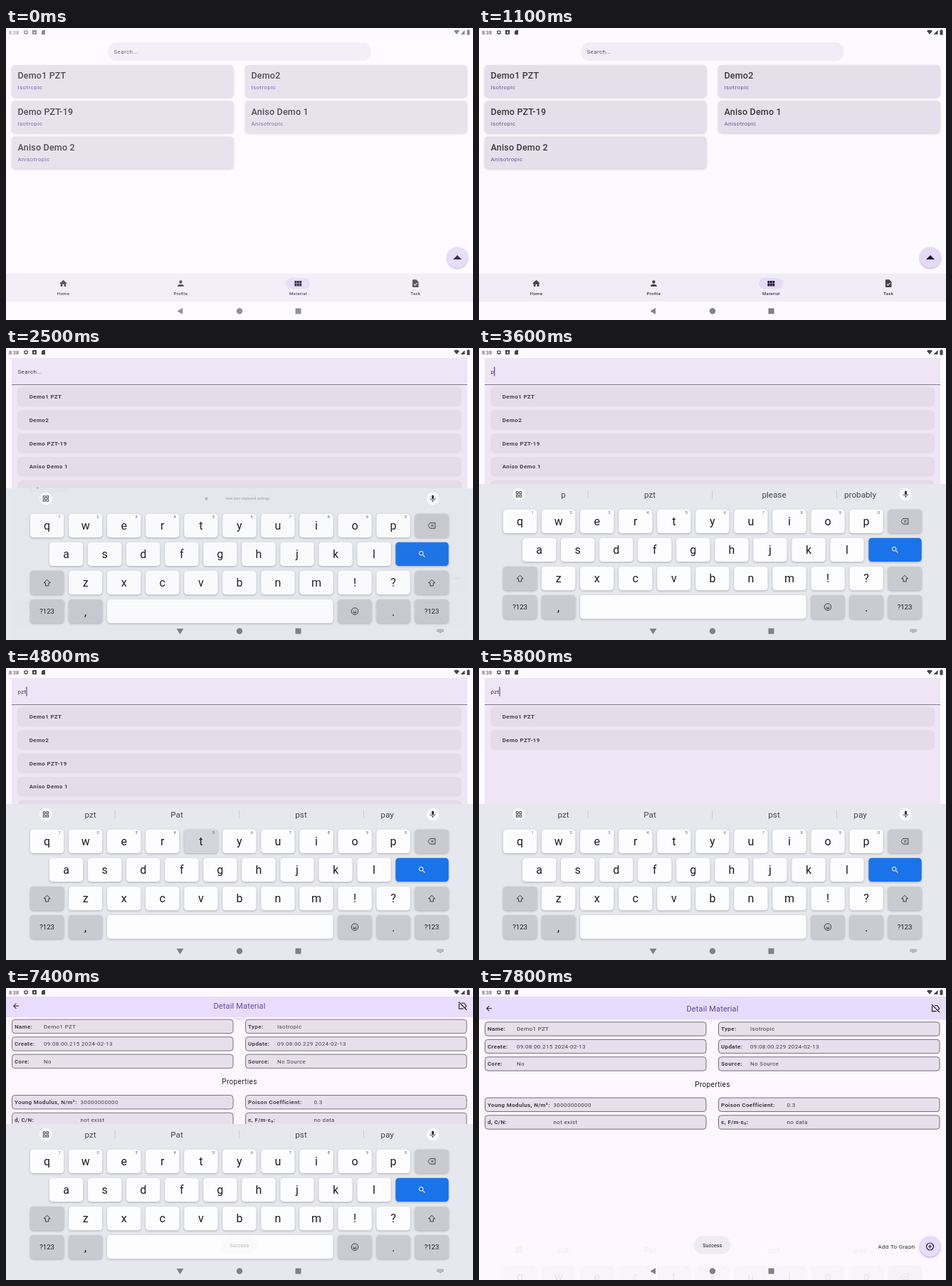
An HTML page with a canvas that plays this animation: 656 px wide and 410 px high, repeating every 8 s.

```html
<!DOCTYPE html>
<html lang="en">
<head>
<meta charset="utf-8">
<title>Material search</title>
<style>
html, body { margin: 0; width: 100%; height: 100%; overflow: hidden; background: #fdfaff; }
canvas { display: block; }
</style>
</head>
<body>
<canvas id="stage" width="656" height="410"></canvas>
<script>
const c = document.getElementById('stage').getContext('2d');
const LOOP = 8000, STEP = 100;
const INK = '#1d1b20';

const icons = {
  home: 'M10 20v-6h4v6h5v-8h3L12 3 2 12h3v8z',
  person: 'M12 12a4 4 0 1 0 0-8 4 4 0 0 0 0 8zm0 2c-2.67 0-8 1.34-8 4v2h16v-2c0-2.66-5.33-4-8-4z',
  grid: 'M3 5h5.3v6.5H3zM9.3 5h5.3v6.5H9.3zM15.7 5H21v6.5h-5.3zM3 12.5h5.3V19H3zM9.3 12.5h5.3V19H9.3zM15.7 12.5H21V19h-5.3z',
  task: 'M14 2H6a2 2 0 0 0-2 2v16a2 2 0 0 0 2 2h12a2 2 0 0 0 2-2V8zM10.5 18L7 14.5l1.4-1.4 2.1 2.1 5-5 1.4 1.4z',
  search: 'M15.5 14h-.8l-.3-.3A6.5 6.5 0 1 0 13.7 14.4l.3.3v.8l5 5 1.5-1.5zM9.5 14a4.5 4.5 0 1 1 0-9 4.5 4.5 0 0 1 0 9z',
  erase: 'M7 4h15v16H7L1.5 12zM10 8.5l7 7M17 8.5l-7 7',
  shift: 'M12 4L3.5 12.5H8V20h8v-7.500h4.500z',
  smile: 'M22 12a10 10 0 1 1-20 0 10 10 0 0 1 20 0zM8 8.500v2M16 8.500v2M7 14.500c2 4 8 4 10 0z',
  mic: 'M12 14a3 3 0 0 0 3-3V5a3 3 0 0 0-6 0v6a3 3 0 0 0 3 3zm5.300-3a5.300 5.100 0 0 1-10.600 0H5c0 3.400 2.700 6.200 6 6.700V21h2v-3.300c3.300-.5 6-3.300 6-6.700z',
  apps: 'M3 3h7v7H3zM14 3h7v7h-7zM3 14h7v7H3zM14 14h7v7h-7z',
  back: 'M20 11H7.800l5.600-5.600L12 4l-8 8 8 8 1.400-1.400L7.800 13H20z',
  labelOff: 'M9 5h7l5 7-4 5.500M14 19H3V6.500M2 2l20 20',
  addCircle: 'M22 12a10 10 0 1 1-20 0 10 10 0 0 1 20 0zM12 7v10M7 12h10',
  gear: 'M18 12a6 6 0 1 1-12 0 6 6 0 0 1 12 0zM12 2v4M12 18v4M3.300 7l3.500 2M17.200 15l3.500 2M3.300 17l3.500-2M17.200 9l3.500-2',
  letter: 'M3 3h18v18H3zM12 6L7.500 18h2.300l.9-3h2.600l.9 3h2.300z',
  sdCard: 'M10 2h10v20H4V8z',
  wifi: 'M12 21L0 6c7-5 17-5 24 0z',
  signal: 'M2 22h20V2z',
  battery: 'M9 4V1h6v3h3v19H6V4z',
  keyboard: 'M1 6h22v8H1zM5 10h14M9 18h6'
};
for (const name in icons) icons[name] = new Path2D(icons[name]);

const clamp = v => Math.min(1, Math.max(0, v));
const lerp = (a, b, p) => a + (b - a) * p;
const easeOut = (p, power) => 1 - (1 - clamp(p)) ** power;

function icon(name, x, y, size, color, stroke) {
  c.save();
  c.translate(x, y);
  c.scale(size / 24, size / 24);
  c.translate(-12, -12);
  c.fillStyle = c.strokeStyle = color;
  c.lineWidth = stroke;
  if (stroke) c.stroke(icons[name]); else c.fill(icons[name], 'evenodd');
  c.restore();
}

// y is the middle of the capitals
function text(str, x, y, size, { color = INK, weight = 400, align = 'left', spacing = 0.35 } = {}) {
  c.font = `${weight} ${size}px Roboto, sans-serif`;
  c.letterSpacing = spacing + 'px';
  c.textAlign = align;
  c.fillStyle = color;
  c.fillText(str, x, y + size * 0.355);
}

function box(x, y, w, h, r, fill, { stroke, shadow } = {}) {
  c.save();
  c.beginPath();
  c.roundRect(x, y, w, h, r);
  if (shadow) { c.shadowColor = shadow; c.shadowBlur = 3; c.shadowOffsetY = 1; }
  c.fillStyle = fill;
  c.fill();
  c.shadowColor = 'transparent';
  if (stroke) { c.strokeStyle = stroke; c.stroke(); }
  c.restore();
}

const disc = (x, y, r, fill, shadow) => box(x - r, y - r, 2 * r, 2 * r, r, fill, { shadow });

function poly(fill, ...points) {
  c.beginPath();
  points.forEach(p => c.lineTo(...p));
  c.fillStyle = fill;
  c.fill();
}

const materials = ['Demo1 PZT', 'Demo2', 'Demo PZT-19', 'Aniso Demo 1', 'Aniso Demo 2'];
const typing = [
  [2000, '', []],
  [3400, 'p', ['p', 'pzt', 'please', 'probably']],
  [4200, 'pz', ['pz', 'pizza', 'pzt', 'puzzle']],
  [4800, 'pzt', ['pzt', 'Pat', 'pst', 'pay']]
];
const presses = [[3200, 'p'], [4100, 'z'], [4700, 't'], [5200, 'search']];

function statusBar(t) {
  c.fillStyle = '#fdf9fe';
  c.fillRect(0, 0, 656, 12);
  c.save();
  if (t < 100) c.globalAlpha = 0.7;
  const color = '#45434a';
  text('8:38', 4, 6.3, 7.3, { color, spacing: 0 });
  icon('gear', 28, 6, 8, color, 3.5);
  icon('letter', 40, 6, 8, color);
  icon('sdCard', 52.5, 6, 7.5, color);
  icon('wifi', 633, 6, 8, color);
  icon('signal', 641.5, 6, 7, color);
  icon('battery', 649.5, 6, 8, color);
  c.restore();
}

function systemNav(keyboardOpen) {
  const color = '#828087';
  if (keyboardOpen) {
    poly(color, [239.5, 394], [249.5, 394], [244.5, 402]);
    icon('keyboard', 610, 397.5, 9, color, 2);
  } else poly(color, [240.5, 397.5], [248, 393], [248, 402]);
  disc(328, 397.5, 4.2, color);
  box(406.5, 393.5, 8, 8, 0.5, color);
}

function cards(top) {
  materials.forEach((name, i) => {
    const x = i % 2 ? 336 : 8, y = top + (i >> 1) * 50.2;
    box(x, y, 311.5, 45, 5, '#e4dfea', { shadow: 'rgba(70,55,90,.25)' });
    text(name, x + 8.5, y + 15, 12.5, { color: '#3a373f', weight: 500, spacing: 0.2 });
    text(i < 3 ? 'Isotropic' : 'Anisotropic', x + 8.5, y + 31.5, 8, { color: '#6659a0', spacing: 0.4 });
  });
}

function bottomNav(opacity) {
  c.save();
  c.globalAlpha *= opacity;
  box(0, 344.5, 656, 40, 0, '#f1edf8');
  box(0, 384.5, 656, 25.5, 0, '#fdfaff');
  c.restore();
  box(393, 351, 34, 15.5, 8, '#e4dcf6');
  [['home', 'Home'], ['person', 'Profile'], ['grid', 'Material'], ['task', 'Task']].forEach(([name, label], i) => {
    const x = 80.5 + i * 164.9;
    icon(name, x, 358.7, 13, i === 2 ? '#211336' : '#45424c');
    text(label, x, 373, 6, { color: '#35323b', weight: 500, align: 'center', spacing: 0.3 });
  });
}

function searchPage(t, shown, typed, cursorOn) {
  const open = t < 2200 ? 0 : easeOut((t - 2100) / 600, 8.2);
  const x = lerp(143, 8, open), y = lerp(20, 14, open), w = lerp(370, 640, open), h = lerp(26.5, 330, open);
  const line = lerp(46, 51.5, open);
  cards(y + h + 5.5);
  c.save();
  c.beginPath();
  c.roundRect(x, y, w, h, lerp(13, 0, clamp(open * 1.2)));
  c.fillStyle = open ? '#eee6f4' : '#f1edf8';
  c.fill();
  c.clip();
  if (open) {
    box(x, line - 0.5, w, 1, 0, '#827b89');
    const found = t < 5500 ? materials : materials.filter(m => m.includes('PZT'));
    found.forEach((name, i) => {
      const top = line + 2.8 + i * 32.8;
      box(x + 8, top, w - 16, 28, 7, '#e5dcea');
      text(name, x + 24.8, top + 13.9, 8, { color: '#45414a', weight: 700 });
    });
  }
  text(typed || 'Search...', x + 8.5, 33, 8, { color: t < 1900 ? '#57535d' : '#3d3944' });
  if (cursorOn) box(x + 8.3 + (typed ? c.measureText(typed).width : 0), 26.5, 1.2, 13, 0, '#5b4a91');
  c.restore();
  bottomNav(1 - 0.6 * shown);
  disc(634, 322.3, 14.5, '#e4daf8', 'rgba(60,40,100,.4)');
  poly('#21103f', [628, 325], [634, 319], [640, 325]);
}

function field(x, y, label, value, gap) {
  box(x + 0.5, y - 9.7, 310.5, 19.4, 4, '#e7dfec', { stroke: '#736c7a' });
  text(label, x + 4, y, 8, { color: '#3d3a42', weight: 700 });
  text(value, x + gap, y, 8, { color: '#3d3a42' });
}

function detailPage(t) {
  const shift = -37.5 * (1 - easeOut((t - 7200) / 400, 3.4));
  const loading = t < 7300;
  box(0, 0, 656, 410, 0, '#fef7ff');
  c.save();
  c.translate(0, shift);
  field(8, 57.5, 'Name:', 'Demo1 PZT', 45);
  field(336, 57.5, 'Type:', 'Isotropic', 45);
  field(8, 82, 'Create:', '09:08:00.215 2024-02-13', 45);
  field(336, 82, 'Update:', '09:08:00.229 2024-02-13', 45);
  field(8, 106.5, 'Core:', 'No', 45);
  field(336, 106.5, 'Source:', 'No Source', 45);
  if (loading) {
    box(8, 121, 640, 7.5, 2, '#e8dfef');
    box(8, 121, 105 * clamp((t - 6900) / 300) ** 1.5, 7.5, 2, '#8669b8');
    c.translate(0, 11.6);
  }
  text('Properties', 328, 135, 10, { align: 'center' });
  field(8, 163.8, 'Young Modulus, N/m²:', loading ? 'no data' : '30000000000', 96.5);
  field(336, 163.8, 'Poison Coefficient:', loading ? 'no data' : '0.3', 96.5);
  field(8, 188.5, 'd, C/N:', 'not exist', 96.5);
  field(336, 188.5, 'ε, F/m·ε₀:', 'no data', 96.5);
  c.restore();

  if (t < 7500) {
    const y = t <= 7200 ? lerp(2, 25, clamp((t - 6900) / 300)) : lerp(25, 33, (t - 7200) / 200);
    disc(328, y, 10, '#fdfbfe', 'rgba(60,40,80,.25)');
    c.beginPath();
    c.arc(328, y, 4.5, -0.8, 0.6);
    c.strokeStyle = '#3f3a48';
    c.lineWidth = 1.3;
    c.stroke();
    c.lineWidth = 1;
  }

  c.save();
  c.translate(0, shift);
  box(0, 0, 656, 44.5, 0, '#e8dcfd');
  icon('back', 14, 28.7, 12, INK);
  text('Detail Material', 328, 28.7, 11, { color: '#5b4595', align: 'center', spacing: 0.15 });
  icon('labelOff', 641.5, 28.7, 13.5, INK, 2);
  c.restore();

  text('Add To Graph', 560.5, 363, 8, { spacing: 0.3 });
  disc(633.5, 363, 14.3, '#e6dafb', 'rgba(60,40,100,.45)');
  icon('addCircle', 633.5, 363, 12, '#21103f', 2.4);
}

function keyboard(shown, opacity, pressed, words) {
  const pitch = 54.05, keyW = 47.3;
  const key = (x, y, w, label, { fill = '#fdfdff', size = 16, draw, id = label } = {}) => {
    const down = id === pressed;
    box(x, y, w, 33.3, 4.5, down ? (id === 'search' ? '#4c8df0' : '#d3d5db') : fill, { shadow: 'rgba(60,64,72,.35)' });
    if (draw) draw(x + w / 2, y + 16.7);
    else text(label, x + w / 2, y + 16.9, size, { color: '#1b1c1f', align: 'center', spacing: 0 });
  };
  const grey = { fill: '#c9cbd1' }, dark = '#33353a';
  const glyph = (name, size, stroke, color = dark) => (x, y) => icon(name, x, y, size, color, stroke);

  c.save();
  c.globalAlpha = opacity;
  c.translate(0, 219 * (1 - shown));
  box(0, 191, 656, 219, 0, '#e6e8ed');

  disc(56, 205.5, 9, '#f8f9fc');
  icon('apps', 56, 205.5, 10, dark, 2.2);
  disc(599.5, 205.5, 9, '#f8f9fc');
  icon('mic', 599.5, 205.5, 12, dark);
  if (words.length) {
    words.forEach((word, i) => text(word, [118.5, 240, 414.5, 535.5][i], 206, 11.7, { color: '#45474c', align: 'center', spacing: 0 }));
    for (const x of [152.5, 327, 502]) box(x, 199.5, 1, 12, 0, '#c9ccd2');
  } else {
    box(279.5, 203.5, 4, 4, 1, '#b5b8bf');
    text('View your clipboard settings', 339, 205.5, 5, { color: '#9a9da5', align: 'center', spacing: 0 });
  }

  [...'qwertyuiop'].forEach((ch, i) => {
    key(34 + i * pitch, 226.7, keyW, ch);
    text((i + 1) % 10 + '', 75 + i * pitch, 231.3, 5.5, { color: '#55575c', align: 'center', spacing: 0 });
  });
  key(574.4, 226.7, keyW, '', { ...grey, draw: glyph('erase', 11.5, 1.9) });

  [...'asdfghjkl'].forEach((ch, i) => key(61 + i * pitch, 266.8, keyW, ch));
  key(547.3, 266.8, 74.4, '', { fill: '#1a73e8', id: 'search', draw: glyph('search', 12, 0, '#fff') });

  key(34, 306.9, keyW, '', { ...grey, draw: glyph('shift', 13, 1.8) });
  [...'zxcvbnm!?'].forEach((ch, i) => key(34 + (i + 1) * pitch, 306.9, keyW, ch));
  key(574.4, 306.9, keyW, '', { ...grey, draw: glyph('shift', 13, 1.8) });

  key(34, 347, keyW, '?123', { ...grey, size: 9.6 });
  key(88, 347, keyW, ',', grey);
  key(142.1, 347, 317.5, '');
  key(466.3, 347, keyW, '', { ...grey, draw: glyph('smile', 11.5, 2) });
  key(520.4, 347, keyW, '.', grey);
  key(574.4, 347, keyW, '?123', { ...grey, size: 9.6 });
  c.restore();
}

function toast(opacity) {
  c.save();
  c.globalAlpha = opacity;
  box(302, 348, 51.5, 25.5, 12.7, '#efecf1');
  text('Success', 327.7, 361, 7.2, { align: 'center', spacing: 0 });
  c.restore();
}

function draw(t) {
  const [typedAt, typed, words] = typing.findLast(s => t >= s[0]) || [Infinity, '', []];
  const cursorOn = t >= typedAt && Math.floor((t - typedAt) / 500) % 2 === 0;
  const press = presses.find(([at]) => t >= at && t < at + 200);
  const closing = t > 7600;
  const shown = closing ? 1 - 0.74 * clamp((t - 7600) / 200) : easeOut((t - 2100) / 600, 3.28);
  const detail = easeOut((t - 6800) / 700, 1.5);

  box(0, 0, 656, 410, 0, '#fdfaff');
  if (detail < 1) {
    c.save();
    c.translate(0, -61 * detail);
    searchPage(t, shown, typed, cursorOn);
    c.restore();
  }
  if (detail > 0) {
    c.save();
    c.globalAlpha = detail;
    detailPage(t);
    c.restore();
  }
  statusBar(t);
  if (shown > 0) keyboard(shown, shown ** (closing ? 2 : 1.3), press && press[1], words);
  systemNav(shown > 0.5);
  if (t > 7300) toast(clamp((t - 7300) / 350));

  // the first page is still fading in
  const veil = 0.12 * (1 - clamp(t / 300));
  if (veil) box(0, 0, 656, 410, 0, `rgba(253,252,254,${veil})`);
}

function tick() {
  draw(Math.floor(performance.now() % LOOP / STEP) * STEP);
  requestAnimationFrame(tick);
}
tick();
</script>
</body>
</html>
```
